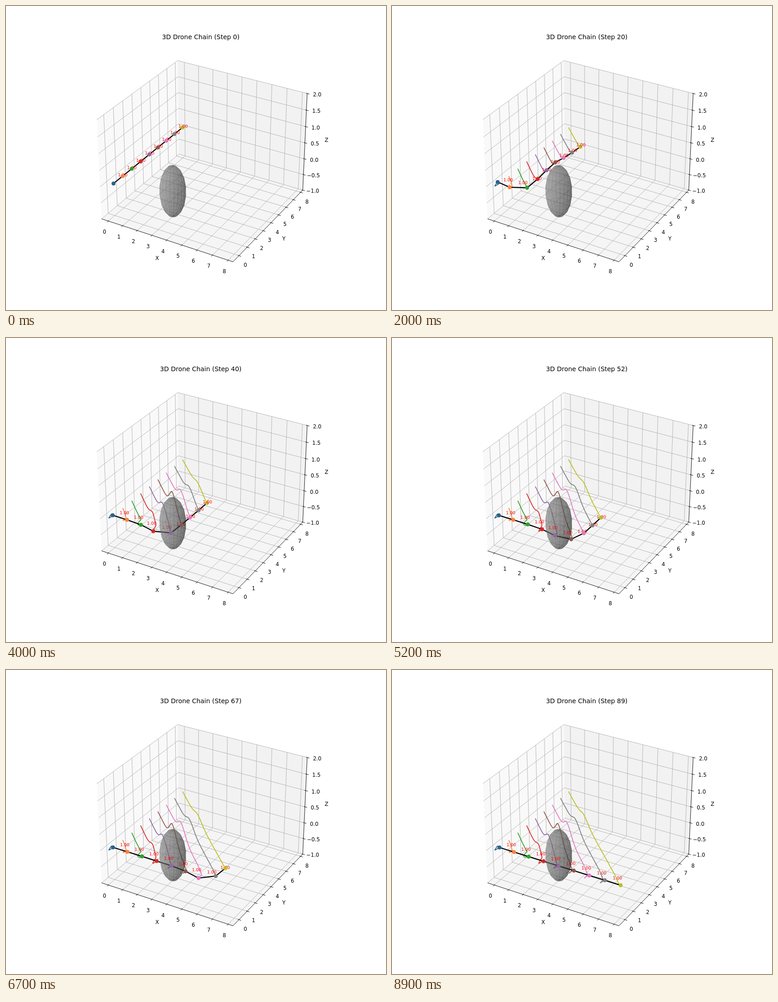
These frames come from a looping animation (837 by 669 pixels, 9 s). An HTML page:

```html
<!DOCTYPE html>
<html lang="en">
<head>
<meta charset="utf-8">
<title>3D Drone Chain</title>
<style>
html, body { margin: 0; width: 100%; height: 100%; overflow: hidden; background: #fff; }
svg { display: block; }
text { font-family: "DejaVu Sans", sans-serif; font-size: 11.62px; text-anchor: middle; }
.grid { fill: none; stroke: #b0b0b0; stroke-width: .93; }
.axis { fill: none; stroke: #000; stroke-width: .93; }
.trail { fill: none; stroke-width: 1.74; stroke-linejoin: round; }
.chain { fill: none; stroke: #000; stroke-width: 2.33; stroke-linejoin: round; }
.title { font-size: 13.95px; }
.length { font-size: 9.3px; fill: #f00; text-anchor: start; }
</style>
</head>
<body>
<svg id="stage" width="837" height="669"></svg>
<script>
const STEPS = 90, STEP_MS = 100, SPEED = 0.1;
const X = [-0.47, 8.305], Y = [-0.71, 8.305], Z = [-1, 2];
const COLORS = ['#2b6288', '#fb8140', '#2ca02c', '#d62728', '#9366a6',
                '#8c564b', '#e377c2', '#7f7f7f', '#bcbd22'];
const ticks = Array.from({ length: 9 }, (_, i) => i);
const stage = document.getElementById('stage');
const clamp = v => Math.max(0, Math.min(1, v));

function add(tag, attrs = {}, parent = stage) {
  const node = document.createElementNS('http://www.w3.org/2000/svg', tag);
  set(node, attrs);
  parent.append(node);
  return node;
}

function set(node, attrs) {
  for (const key in attrs) node.setAttribute(key, attrs[key]);
}

function label(content, x, y, cls = '', parent = stage) {
  const node = add('text', { x, y, class: cls }, parent);
  node.textContent = content;
  return node;
}

// Perspective camera: elevation 30, azimuth -60, distance 10. Returns [x, y, depth].
function project([x, y, z]) {
  const unit = (value, [lo, hi], size) => ((value - lo) / (hi - lo) - 0.5) * size;
  const a = unit(x, X, 1.1905), b = unit(y, Y, 1.1905), c = unit(z, Z, 0.8929);
  const depth = 10 - (0.433 * a - 0.75 * b + 0.5 * c);
  const scale = 2784.5 / depth;
  return [
    436.2 + scale * (0.866 * a + 0.5 * b),
    330.9 - scale * (-0.25 * a + 0.433 * b + 0.866 * c),
    depth
  ];
}

const points = list => list.map(p => p[0].toFixed(2) + ',' + p[1].toFixed(2)).join(' ');
const line = (cls, ...corners) =>
  add('polyline', { class: cls, points: points(corners.map(project)) });
const pane = (fill, ...corners) =>
  add('polygon', { fill, points: points(corners.map(project)) });

function tickLabel(content, at, dx, dy) {
  const [x, y] = project(at);
  label(content, x + dx, y + dy + 4.2);
}

function drawAxes() {
  const [x0, x1] = X, [y0, y1] = Y, [z0, z1] = Z;
  const tickX = 0.08 * (x1 - x0), tickY = 0.08 * (y1 - y0);
  const heights = ticks.slice(0, 7).map(i => -1 + i / 2);

  pane('#f9f9f9', [x0, y0, z0], [x0, y1, z0], [x0, y1, z1], [x0, y0, z1]);
  pane('#f2f2f2', [x0, y1, z0], [x1, y1, z0], [x1, y1, z1], [x0, y1, z1]);
  pane('#f5f5f5', [x0, y0, z0], [x1, y0, z0], [x1, y1, z0], [x0, y1, z0]);

  for (const v of ticks) {
    line('grid', [v, y0, z0], [v, y1, z0], [v, y1, z1]);
    line('grid', [x1, v, z0], [x0, v, z0], [x0, v, z1]);
  }
  for (const v of heights) line('grid', [x0, y0, v], [x0, y1, v], [x1, y1, v]);

  line('axis', [x0, y0, z0], [x1, y0, z0]);
  line('axis', [x1, y0, z0], [x1, y1, z0]);
  line('axis', [x1, y1, z0], [x1, y1, z1]);

  for (const v of ticks) {
    line('axis', [v, y0 + 0.1 * tickY, z0], [v, y0 - 0.2 * tickY, z0]);
    line('axis', [x1 - 0.1 * tickX, v, z0], [x1 + 0.2 * tickX, v, z0]);
    tickLabel(v, [v, y0, z0], -8.3, 24);
    tickLabel(v, [x1, v, z0], 14, 20.5);
  }
  for (const v of heights) {
    line('axis', [x1 - 0.1 * tickX, y1, v], [x1 + 0.2 * tickX, y1, v]);
    tickLabel(v.toFixed(1).replace('-', '\u2212'), [x1, y1, v], 22, 2);
  }
  label('X', 333, 559.2);
  label('Y', 612, 516.2);
  label('Z', 706, 299.2);
}

// Draws the shaded obstacle and returns its group with its farthest depth.
function drawSphere() {
  const cols = 19, rows = 9, radius = 0.77, center = [3.42, 1, 0];
  const normal = (i, j) => {
    const u = 2 * Math.PI * i / cols, v = Math.PI * j / rows;
    return [Math.cos(u) * Math.sin(v), Math.sin(u) * Math.sin(v), Math.cos(v)];
  };
  const vertex = (i, j) => project(normal(i, j).map((n, k) => center[k] + radius * n));
  const faces = [];
  for (let i = 0; i < cols; i++) {
    for (let j = 0; j < rows; j++) {
      const corners = [vertex(i, j), vertex(i + 1, j), vertex(i + 1, j + 1), vertex(i, j + 1)];
      const [a, b, c] = normal(i + 0.5, j + 0.5);
      const light = (-2 * a - 2 * b + c) / 3;
      const tone = Math.round(128 * (0.65 + 0.35 * light));
      faces.push({ corners, tone, depth: Math.max(...corners.map(p => p[2])) });
    }
  }
  faces.sort((a, b) => b.depth - a.depth);
  const node = add('g', { 'fill-opacity': 0.38, 'stroke-opacity': 0.38, 'stroke-width': 0.3 });
  for (const { corners, tone } of faces) {
    const color = `rgb(${tone},${tone},${tone})`;
    add('polygon', { points: points(corners), fill: color, stroke: color }, node);
  }
  return { node, depth: faces[0].depth };
}

// Drone i flies diagonally from (0, i) to (i, 0). The obstacle lifts the chain, most at
// drone 5; on arrival a drone swings past its goal, then the tightening chain pulls it back.
function position(i, step) {
  const travelled = Math.min(SPEED * step, i);
  const since = step - i / SPEED;
  const late = Math.max(0, since);
  const slack = 1 - clamp((step - 78) / 9);

  const swing = 0.38 * (late / 7 * Math.exp(1 - late / 7)) ** 2;
  const lag = 0.1 * clamp(step / 8) * clamp(1 + since / 8) * Math.exp(-late / 60);

  const peak = 25.5 - 1.5 * Math.max(0, 5 - i);
  const spread = step < peak ? 4.5 : 6.5;
  const lift = 0.5 * 0.65 ** Math.abs(i - 5) * Math.exp(-(((step - peak) / spread) ** 2) / 2);

  return [travelled - lag * slack, i - travelled - swing * slack, lift];
}

drawAxes();
const title = label('', 429, 73.4, 'title');
const drones = COLORS.map((color, i) => {
  const path = Array.from({ length: STEPS }, (_, step) => position(i, step));
  return { path, screen: path.map(project), trail: add('polyline', { class: 'trail', stroke: color }) };
});
const chain = add('polyline', { class: 'chain' });
const solids = add('g');
const labels = add('g');
const lengths = drones.slice(1).map(() => label('1.00', 0, 0, 'length', labels));
const sphere = drawSphere();
drones.forEach((drone, i) => {
  drone.dot = add('circle', { r: 4.4, fill: COLORS[i] });
});

function render(step) {
  title.textContent = `3D Drone Chain (Step ${step})`;

  for (const { screen, trail, dot } of drones) {
    set(trail, { points: step ? points(screen.slice(0, step + 1)) : '' });
    set(dot, { cx: screen[step][0], cy: screen[step][1] });
  }
  set(chain, { points: points(drones.map(d => d.screen[step])) });

  lengths.forEach((node, i) => {
    const from = drones[i].path[step], to = drones[i + 1].path[step];
    const [mx, my, mz] = from.map((v, k) => (v + to[k]) / 2);
    const [x, y] = project([mx, my, mz + 0.1]);
    set(node, { x, y });
  });

  // Far to near; the labels lie just above the farthest solid.
  const order = [sphere, ...drones.map(d => ({ node: d.dot, depth: d.screen[step][2] }))]
    .sort((a, b) => b.depth - a.depth)
    .map(item => item.node);
  solids.replaceChildren(order[0], labels, ...order.slice(1));
}

let shown = -1;
const start = performance.now();
function tick() {
  const step = Math.floor((performance.now() - start) / STEP_MS) % STEPS;
  if (step !== shown) render(shown = step);
  requestAnimationFrame(tick);
}
tick();
</script>
</body>
</html>
```
